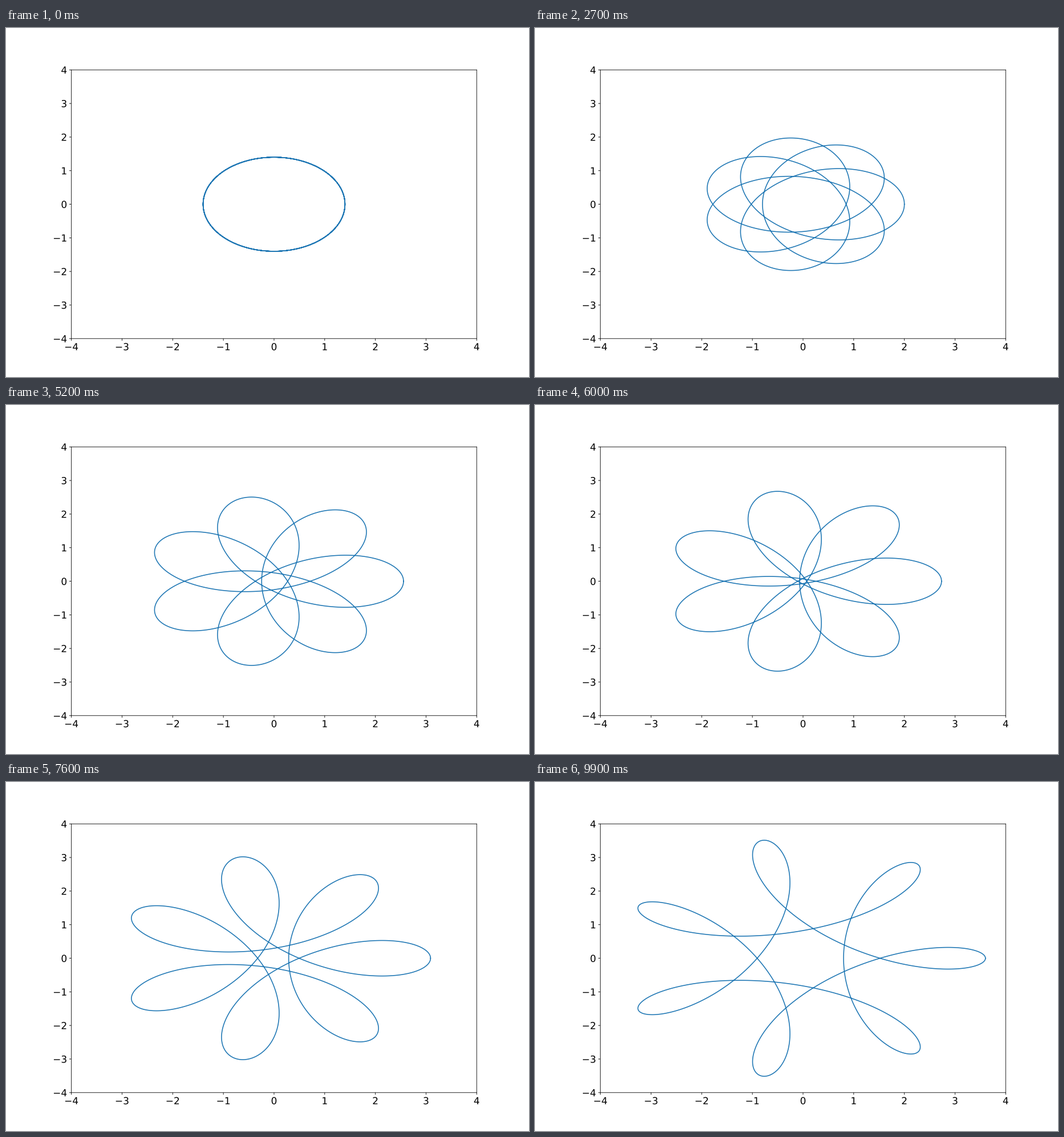
A matplotlib script that plays this animation: 917 px wide and 611 px high, repeating every 10 s.

```python
import numpy as np
import matplotlib.pyplot as plt
from matplotlib.animation import FuncAnimation
from matplotlib.patheffects import Normal

WIDTH, HEIGHT, DPI = 917, 611, 76.4
FRAMES, INTERVAL = 100, 100
RADIUS = 1.4       # path of the rolling circle's centre
RATIO = 0.4        # spin of the pen arm relative to the centre
MAX_ARM = 2.2
TICK, PAD = 3.5, 3.5   # points

# Keep everything at sub-pixel positions.
plt.rcParams.update({
    "font.family": "DejaVu Sans",
    "font.size": 16,
    "text.hinting": "no_hinting",
    "path.snap": False,
    "path.simplify": False,
})

# The tiny margin keeps float rounding from losing a pixel.
fig, ax = plt.subplots(
    figsize=((WIDTH + 1e-6) / DPI, (HEIGHT + 1e-6) / DPI), dpi=DPI)


def draw_ticks(values):
    size = TICK * DPI / 72
    box = ax.get_window_extent()
    style = dict(colors="black", lw=0.8, clip_on=False)
    ax.vlines(values, -size / box.height, 0,
              transform=ax.get_xaxis_transform(), **style)
    ax.hlines(values, -size / box.width, 0,
              transform=ax.get_yaxis_transform(), **style)


ticks = np.arange(-4, 5)
draw_ticks(ticks)
ax.set(xlim=(-4, 4), ylim=(-4, 4), xticks=ticks, yticks=ticks)
ax.tick_params(length=0, pad=TICK + PAD)
for label in ax.get_xticklabels() + ax.get_yticklabels():
    label.set_path_effects([Normal()])   # draws the text as outlines

theta = np.linspace(0, 10 * np.pi, 2001)
line, = ax.plot([], [], color="#1f77b4", lw=1.5)


def trochoid(arm):
    x = RADIUS * np.cos(theta) + arm * np.cos(RATIO * theta)
    y = RADIUS * np.sin(theta) - arm * np.sin(RATIO * theta)
    return x, y


def update(i):
    line.set_data(*trochoid(MAX_ARM * i / (FRAMES - 1)))
    return line,


anim = FuncAnimation(fig, update, frames=FRAMES, interval=INTERVAL,
                     repeat=True, repeat_delay=0)
plt.show()
```
